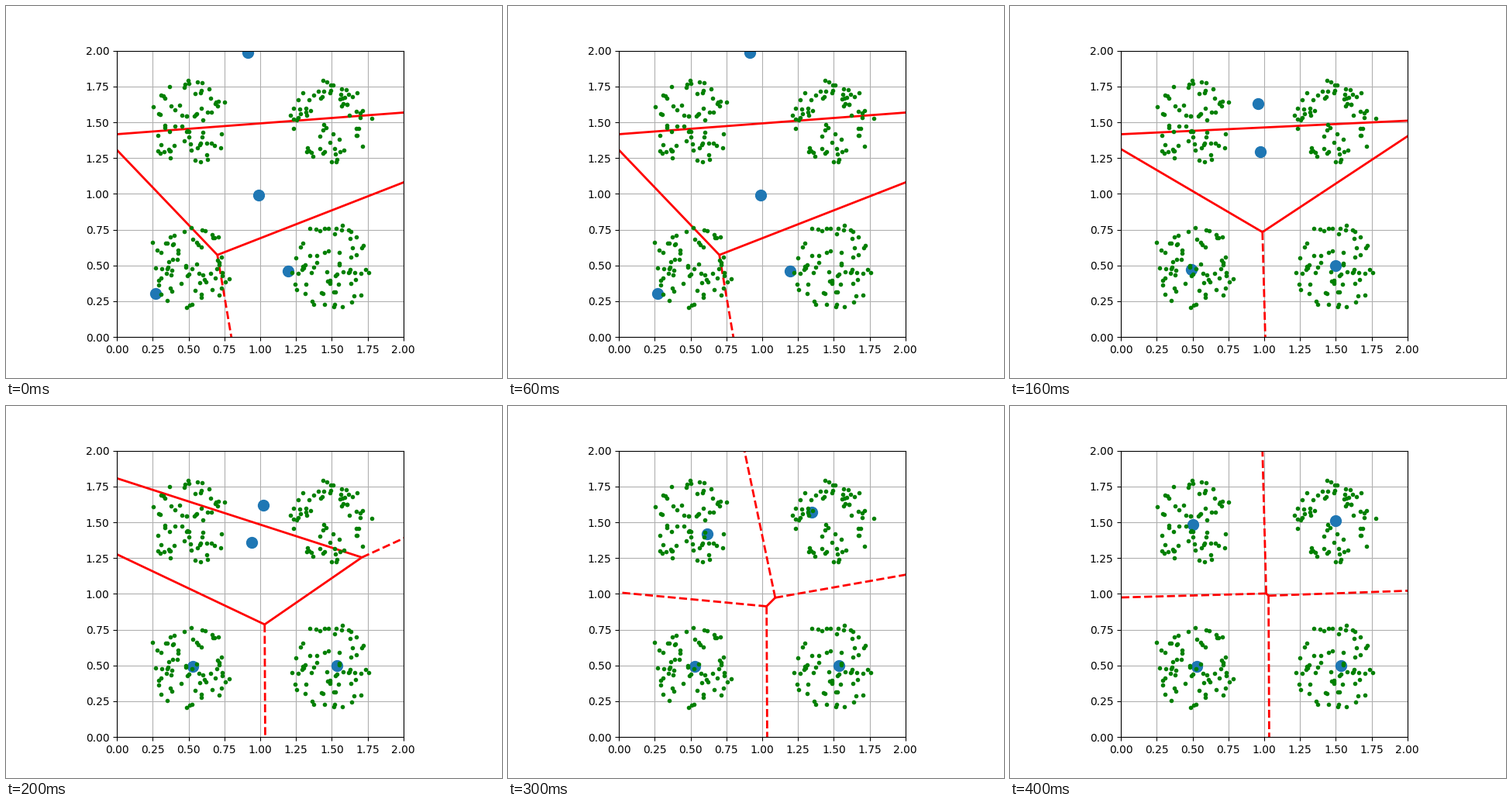
These frames come from a looping animation (640 by 480 pixels, 0.46 s). A matplotlib script:

```python
from itertools import combinations, product

import matplotlib.pyplot as plt
import numpy as np
from matplotlib.animation import FuncAnimation
from matplotlib.collections import LineCollection

TICK = 20            # ms per animation frame
TICKS_PER_STEP = 5   # each k-means step lasts 100 ms, the last one 60 ms
FRAMES = 23

CLUSTER_SIZE = 72
RADIUS = 0.3

# Centroids per step: top A, top B, lower right, lower left
SETTLED = [(1.536, 0.498), (0.529, 0.493)]
STEPS = np.array([
    [(0.915, 1.985), (0.990, 0.992), (1.197, 0.461), (0.270, 0.303)],
    [(0.957, 1.631), (0.973, 1.293), (1.497, 0.500), (0.492, 0.473)],
    [(1.024, 1.618), (0.941, 1.361), *SETTLED],
    [(1.347, 1.572), (0.616, 1.419), *SETTLED],
    [(1.500, 1.511), (0.502, 1.485), *SETTLED],
])


def sample_clusters():
    """Spread points evenly over a disc in each quadrant."""
    rng = np.random.default_rng(7)
    discs = []
    for center in product((0.5, 1.5), repeat=2):
        r = RADIUS * np.sqrt(rng.random(CLUSTER_SIZE))
        a = rng.uniform(0, 2 * np.pi, CLUSTER_SIZE)
        discs.append(center + np.column_stack([r * np.cos(a), r * np.sin(a)]))
    return np.vstack(discs)


def circumcenter(a, b, c):
    rhs = [(b @ b - a @ a) / 2, (c @ c - a @ a) / 2]
    return np.linalg.solve([b - a, c - a], rhs)


def voronoi(sites):
    """Return the bounded and the unbounded edges of the diagram."""
    ends = {}
    for tri in combinations(range(len(sites)), 3):
        v = circumcenter(*sites[list(tri)])
        dist = np.linalg.norm(sites - v, axis=1)
        if dist.min() >= dist[tri[0]] - 1e-9:
            for pair in combinations(tri, 2):
                ends.setdefault(pair, []).append(v)

    bounded, rays = [], []
    middle = sites.mean(axis=0)
    for (i, j), verts in ends.items():
        if len(verts) == 2:
            bounded.append(verts)
            continue
        dx, dy = sites[j] - sites[i]
        normal = np.array([-dy, dx]) / np.hypot(dx, dy)
        side = np.sign((sites[[i, j]].mean(axis=0) - middle) @ normal)
        rays.append([verts[0], verts[0] + 3 * side * normal])
    return bounded, rays


fig, ax = plt.subplots(figsize=(6.4, 4.8), dpi=100)
ax.set_aspect("equal")
ax.set(xlim=(0, 2), ylim=(0, 2))
ax.set_xticks(np.arange(0, 2.01, 0.25))
ax.set_yticks(np.arange(0, 2.01, 0.25))
ax.grid(True)

centroids, = ax.plot([], [], ".", color="C0", markersize=20)
solid = LineCollection([], colors="red", linewidths=2)
dashed = LineCollection([], colors="red", linewidths=2, linestyles="dashed")
ax.add_collection(solid, autolim=False)
ax.add_collection(dashed, autolim=False)
ax.plot(*sample_clusters().T, "g.")


def draw(frame):
    sites = STEPS[frame // TICKS_PER_STEP]
    bounded, rays = voronoi(sites)
    centroids.set_data(*sites.T)
    solid.set_segments(bounded)
    dashed.set_segments(rays)
    return centroids, solid, dashed


anim = FuncAnimation(fig, draw, frames=FRAMES, interval=TICK,
                     repeat=True, repeat_delay=0)
plt.show()
```
